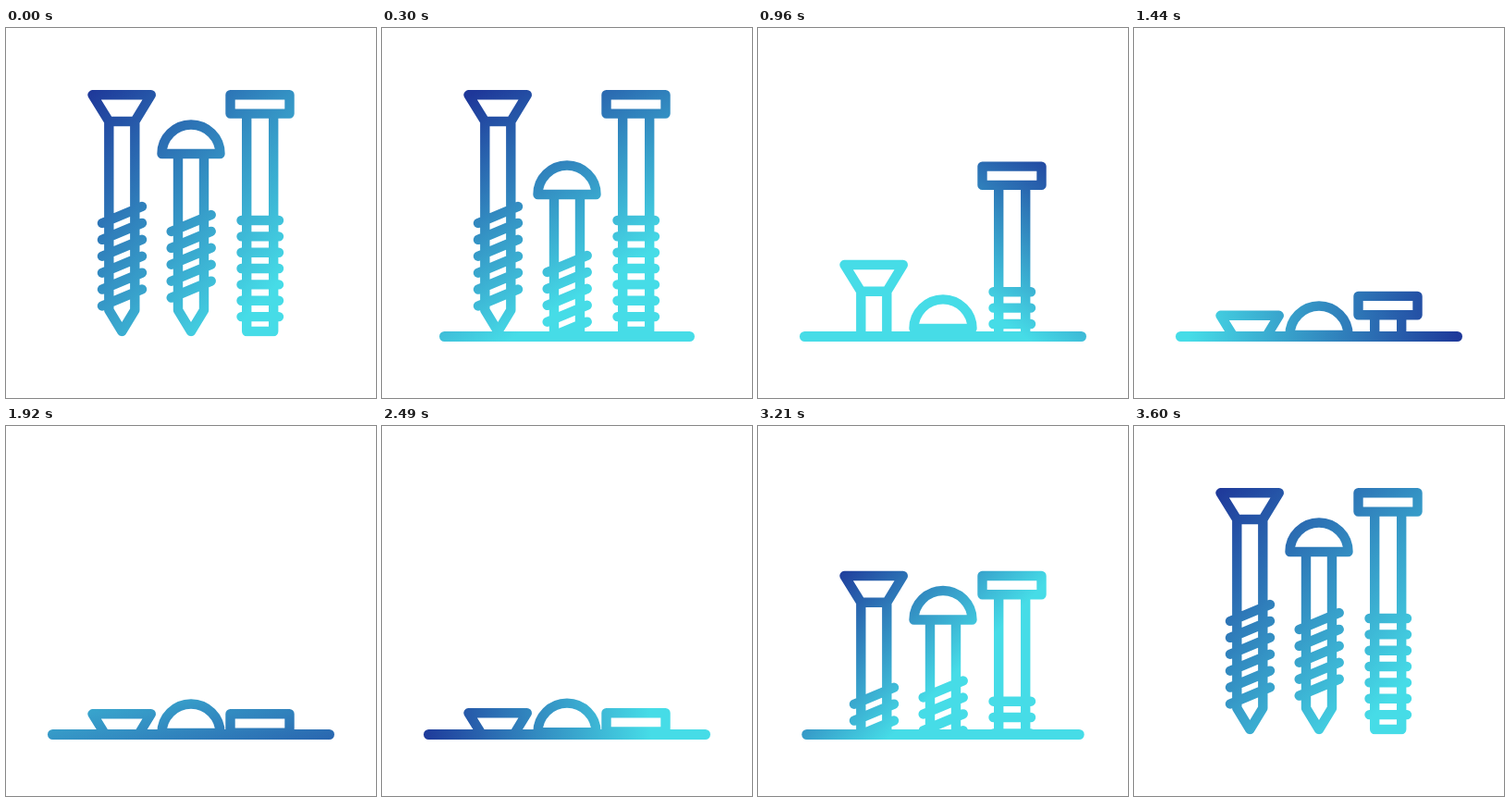
These frames come from a looping animation (400 px wide and 400 px high, 5.63 s). An HTML page with a canvas:

```html
<!DOCTYPE html>
<html lang="en">
<head>
<meta charset="utf-8">
<title>Screws and bolt</title>
<style>
  html, body { margin: 0; width: 100%; height: 100%; overflow: hidden; background: #fff; }
  canvas { display: block; width: 400px; height: 400px; }
</style>
</head>
<body>
<canvas id="stage"></canvas>
<script>
const LOOP = 5630, STEP = 30, GROUND = 333.5;
const canvas = document.getElementById('stage');
const ctx = canvas.getContext('2d');
const ratio = window.devicePixelRatio || 1;
canvas.width = canvas.height = 400 * ratio;

const clamp = u => Math.min(1, Math.max(0, u));
const mix = (a, b, u) => a + (b - a) * u;

// cubic-bezier(.345, 0, .35, 1), solved by bisection
function ease(u) {
  if (u <= 0 || u >= 1) return clamp(u);
  let lo = 0, hi = 1, s = 0.5;
  for (let i = 0; i < 24; i++) {
    s = (lo + hi) / 2;
    const x = 3 * s * (1 - s) * (1 - s) * 0.345 + 3 * s * s * (1 - s) * 0.35 + s * s * s;
    if (x < u) lo = s; else hi = s;
  }
  return s * s * (3 - 2 * s);
}

// Out after `start`, back again so that it ends at 3600 ms
function there(t, start, span) {
  return t < 2100 ? ease((t - start) / span) : ease((3600 - t) / span);
}

// Threads: parallel strokes from the left end down the shaft
function threads(path, x1, x2, y, rise, count, gap) {
  for (let i = 0; i < count; i++) {
    path.moveTo(x1, y + i * gap);
    path.lineTo(x2, y + i * gap - rise);
  }
}

function screw(head, x, top, firstThread, count) {
  const path = new Path2D(head);
  path.moveTo(x - 14, top);
  path.lineTo(x - 14, 305);
  path.lineTo(x, 328);
  path.lineTo(x + 14, 305);
  path.lineTo(x + 14, top);
  threads(path, x - 21.3, x + 21.7, firstThread, 18, count, 17.9);
  return path;
}

function hexBolt() {
  const path = new Path2D('M242.5 72.3H306.5V92.6H242.5Z M260.2 93V328H289.2V93');
  threads(path, 254.5, 295, 208, 0, 7, 17.35);
  return path;
}

const parts = [
  { path: screw('M93.5 72.3H156.8L139.3 101H111.3Z', 125.3, 101, 211, 6), start: 300, drop: 239 },
  { path: screw('M168.5 136A31.5 31.5 0 0 1 231.5 136Z', 200, 136, 220, 5), start: 0, drop: 196 },
  { path: hexBolt(), start: 600, drop: 239 }
];

// Turning gradient: time, dark end x y, light end x y
const turns = [
  [0, 88, 67, 300, 270],
  [540, 110, 70, 177, 285],
  [960, 312, 120, 204, 276],
  [1350, 355, 325, 60, 325],
  [1650, 355, 333, 60, 320],
  [1980, 200, 460, 200, 180],
  [2340, 40, 333, 290, 318],
  [2490, 40, 333, 290, 318],
  [3210, 85, 150, 207, 273],
  [3600, 88, 67, 300, 270],
  [LOOP, 88, 67, 300, 270]
];

function paint(t) {
  let i = 0;
  while (i < turns.length - 2 && t >= turns[i + 1][0]) i++;
  const a = turns[i], b = turns[i + 1];
  const u = clamp((t - a[0]) / (b[0] - a[0]));
  const ends = [1, 2, 3, 4].map(k => mix(a[k], b[k], u));
  const fill = ctx.createLinearGradient(...ends);
  fill.addColorStop(0, '#1e3799');
  fill.addColorStop(1, '#46dce7');
  return fill;
}

function draw(t) {
  ctx.setTransform(ratio, 0, 0, ratio, 0, 0);
  ctx.clearRect(0, 0, 400, 400);
  ctx.lineCap = ctx.lineJoin = 'round';
  ctx.lineWidth = 10.4;

  ctx.save();
  ctx.beginPath();
  ctx.rect(0, 0, 400, GROUND);
  ctx.clip();
  for (const { path, start, drop } of parts) {
    ctx.save();
    ctx.translate(0, drop * there(t, start, 1200));
    ctx.stroke(path);
    ctx.restore();
  }
  ctx.restore();

  const half = 149.5 * there(t, 0, 450);
  if (half > 0) {
    ctx.lineWidth = 11;
    ctx.beginPath();
    ctx.moveTo(200 - half, GROUND);
    ctx.lineTo(200 + half, GROUND);
    ctx.stroke();
  }

  // Colour everything drawn so far
  ctx.globalCompositeOperation = 'source-in';
  ctx.fillStyle = paint(t);
  ctx.fillRect(0, 0, 400, 400);
  ctx.globalCompositeOperation = 'source-over';
}

const begin = performance.now();
function tick() {
  const t = (performance.now() - begin) % LOOP;
  draw(Math.floor(t / STEP) * STEP);
  requestAnimationFrame(tick);
}
tick();
</script>
</body>
</html>
```
